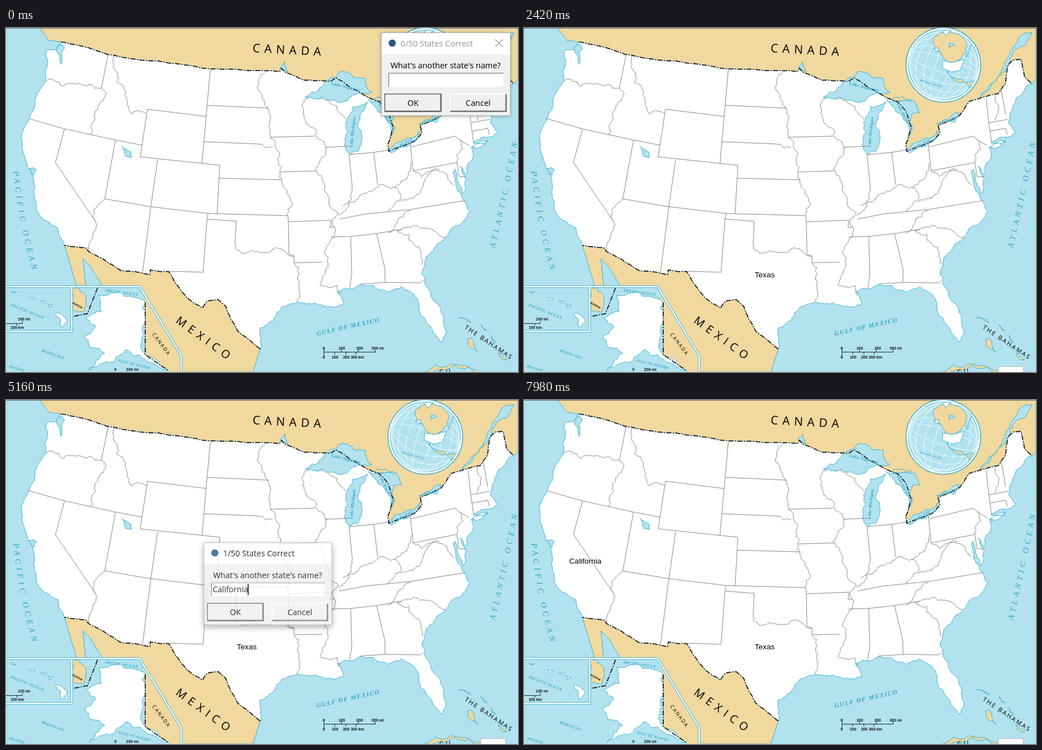
An HTML page that plays this animation: 912 by 614 pixels, repeating every 8 s.

```html
<!DOCTYPE html>
<html lang="en">
<head>
<meta charset="utf-8">
<title>States quiz</title>
<style>
  html, body { margin: 0; width: 100%; height: 100%; overflow: hidden; background: #b2e2ee; }
  svg { display: block; }
  text { white-space: pre; }
  .sans { font-family: "Open Sans", "Noto Sans", sans-serif; }
  .sea { font-family: "Liberation Serif", "Noto Serif", serif; font-style: italic; fill: #2ba6c6; }
  .mark { font-family: "Liberation Sans", Arial, sans-serif; font-size: 13.6px; }
  .ui { font-family: "Open Sans", "Noto Sans", sans-serif; font-size: 14.35px; }
  .tiny { font: bold 7px "Liberation Sans", sans-serif; fill: #111; }
  .land { fill: #f0d89f; }
  .water { fill: #b2e2ee; }
  .usa { fill: #fff; }
  .shore { stroke: #35b0cf; }
  .border { stroke: #858585; }
  .dash { stroke: #1c1c1c; stroke-width: 1.8; stroke-dasharray: 9 2.5 2 2.5; }
</style>
</head>
<body>
<svg id="stage" width="912" height="614">
  <g id="map"></g>
  <g id="globe" transform="translate(747 66)"></g>
  <g id="labels"></g>
  <rect id="box" x="845.5" y="604.5" width="44" height="12" fill="#fff" stroke="#bbb"/>
  <text id="texas" class="mark" x="411" y="444.5">Texas</text>
  <text id="cali" class="mark" x="80.5" y="292">California</text>
  <g id="dialog">
    <rect id="shade" width="231" height="149" fill="#f0f0f0"/>
    <rect width="231" height="39" fill="#fff"/>
    <rect x=".5" y=".5" width="230" height="148" fill="none" stroke="#8c8c8c" stroke-opacity=".75"/>
    <circle cx="20" cy="19" r="6.5" fill="#25597f"/>
    <text id="title" class="ui" x="35" y="25" style="font-size:14.5px"></text>
    <path id="close" d="M203.5,12.5l13,13m0,-13l-13,13" fill="none" stroke-width="1.1"/>
    <text class="ui" x="17" y="64">What's another state's name?</text>
    <rect x="13" y="72" width="205" height="25" fill="#fff"/>
    <path d="M13.5,97V72.5H218" fill="none" stroke="#8a8a8a"/>
    <path d="M14.5,96V73.5H217" fill="none" stroke="#c9c9c9"/>
    <text id="entry" class="ui" x="16" y="90"></text>
    <rect id="caret" y="75" width="2" height="20"/>
    <g id="buttons"></g>
  </g>
</svg>
<script>
const $ = id => document.getElementById(id);
const add = (id, svg) => $(id).insertAdjacentHTML('beforeend', svg);

let seed = 11;
const rnd = () => (seed = (seed * 16807) % 2147483647) / 2147483647;

// Midpoint displacement turns a few points into a natural shoreline.
function rough(s, amp) {
  const pts = s.trim().split(/\s+/).map(p => p.split(',').map(Number));
  const out = [pts[0]];
  const split = (a, b) => {
    const dx = b[0] - a[0], dy = b[1] - a[1];
    if (Math.hypot(dx, dy) < 3) return out.push(b);
    const k = (rnd() - .5) * amp;
    const m = [(a[0] + b[0]) / 2 - dy * k, (a[1] + b[1]) / 2 + dx * k];
    split(a, m);
    split(m, b);
  };
  pts.slice(1).forEach((p, i) => split(pts[i], p));
  return out.map(p => p[0].toFixed(1) + ',' + p[1].toFixed(1)).join(' ');
}
const poly = (pts, cls) => `<polygon class="${cls}" points="${pts}"/>`;
const line = (pts, cls) => `<polyline fill="none" class="${cls}" points="${pts}"/>`;
const blob = (s, cls, amp = .35) => {
  const pts = s.trim().split(/\s+/);
  return poly(rough([...pts, pts[0]].join(' '), amp), cls + ' shore');
};
const land = s => add('map', blob(s, 'land'));
const water = s => add('map', blob(s, 'water'));
const white = s => add('map', blob(s, 'usa'));
const border = s => add('map', line(s, 'border'));
const river = s => add('map', line(rough(s, .45), 'border'));

const north = rough(`98,25 180,47 363,73 487,78 491,72 497,79 530,93 578,95 588,89 645,124 664,131
  680,148 690,178 680,208 682,220 728,202 741,187 738,174 775,157 793,131 845,117 858,98 862,66
  872,57 885,56 892,88 905,100`, .06);
const atlantic = rough(`905,100 866,152 863,170 877,187 832,205 858,200 830,214 830,236 818,262
  808,246 820,270 814,296 800,252 802,285 819,312 826,326 793,358 784,373 757,400 741,440 746,456`, .35);
const gulf = rough(`746,456 768,492 784,540 776,561 748,524 738,512 731,482 704,462 680,472 655,460
  613,466 590,470 600,495 550,490 520,489 492,498 452,536 453,573`, .32);
const south = rough(`453,573 412,540 392,498 378,485 358,488 350,500 322,481 290,435 257,432 256,440
  205,433 146,398 143,393 104,388`, .08);
const pacific = rough('104,388 92,356 62,338 54,325 47,263 34,232 28,200 41,162 71,95 74,60 72,40 90,38 98,25', .2);

add('map', '<rect width="912" height="614" class="water"/>');
add('map', poly(north + ' 912,92 912,0 60,0 76,22', 'land shore'));
add('map', poly(south + ' 126,461 142,461 137,412 150,425 172,461 232,461 300,614 440,614 448,588', 'land shore'));
add('map', poly([north, atlantic, gulf, south, pacific].join(' '), 'usa'));
for (const coast of [atlantic, gulf, pacific]) add('map', line(coast, 'shore'));

// lakes and bays
water('533,123 574,93 600,77 640,90 652,115 622,119 605,131 562,123');
water('605,170 618,140 645,133 626,172 627,220 612,226 604,200');
water('645,127 688,126 706,152 692,152 692,182 684,196 682,170 657,140');
water('680,219 705,203 741,181 716,211 686,223');
water('735,171 775,151 765,169');
water('206,211 223,222 224,231 214,230');
water('95,28 104,36 98,65 90,42');
water('488,72 496,60 503,79');
water('41,250 54,253 50,263');
water('812,124 862,52 880,20 905,8 850,80');
land('655,127 676,123 690,131');
white('828,214 858,203 848,211');

// western states
border('182,47 170,107');
border('41,162 104,180 195,200 242,209');
border('104,181 88,240 160,346');
border('195,200 176,305 258,319 360,331 502,335');
border('381,245 239,230 252,145 357,158');
border('270,235 258,319 243,438');
border('364,74 349,242');
border('358,138 468,143');
border('353,203 450,207');
border('381,245 376,331');
border('379,268 492,271');
border('360,331 358,341 410,345 408,386');
border('358,341 351,436 290,434');
river('71,95 100,104 125,100 170,107 178,118 157,157 150,190');
river('195,48 192,72 213,115 218,140 225,153 250,153');
river('176,305 158,322 157,342 162,350 155,365 146,398');

// central states
border('471,195 550,193');
border('488,257 552,255');
border('502,335 503,346 579,343 577,356 585,355');
border('503,346 504,404 513,407 513,419 563,418');
river('450,207 475,212');
river('461,79 472,160 471,195 488,257 501,290 502,335');
river('408,386 450,400 513,407');
river('513,419 522,440 519,489');
river('540,124 527,140 528,152 550,180 570,220 552,255 573,298 592,330');
river('592,330 567,400 559,458 590,460 595,475');
river('556,126 590,140 605,163');
border('568,213 611,211');

// eastern states
border('611,226 617,285');
border('611,226 655,222 680,218');
border('655,222 662,280');
border('720,205 725,255 803,240 807,265 820,266');
border('722,212 800,193 808,200 825,210');
border('594,341 640,332 720,324 818,308');
border('578,373 614,372 660,367 705,359');
border('614,372 616,440 612,465');
border('660,367 675,430 675,454');
border('632,457 675,454 738,455 744,450');
border('823,125 828,170 833,205');
border('850,110 858,155');
border('828,169 862,163');
border('830,184 858,179 861,190');
river('617,285 600,318');
river('592,335 612,310 665,280 693,285 720,255 725,240');
river('693,285 702,307 680,328');
river('702,309 725,305 745,275 772,252');
river('725,255 740,265 765,250 797,280');
river('720,324 695,350 680,365');
river('697,361 742,422');
river('697,361 715,355 760,360 783,374');
river('808,200 814,216 803,240');
river('840,117 838,165');
add('map', line(north, 'dash') + line(south, 'dash'));

// southern islands
land('806,517 818,520 828,527');
land('822,555 829,553 840,579');
land('846,529 857,540 851,538');
land('862,548 872,562 866,557');
land('876,580 892,592 884,592');
land('740,616 800,602 845,616');

// inset panels
add('map', poly('0,462 238,462 312,585 312,614 0,614', 'water'));
add('map', poly('238,463 312,585 312,614 292,614 248,583 248,490', 'land'));
land('118,463 128,463 143,494 138,508 118,503');
white(`165,477 200,470 248,490 248,583 290,612 238,584 213,575 192,596 148,611 176,581 149,570 140,550
  160,533 142,518 170,505`);
white('8,469 19,471 13,474');
white('42,481 52,484 45,486');
white('62,487 72,488 70,492');
white('74,492 84,494 77,499');
white('88,510 109,522 98,534');
add('map', line('248,490 248,583 290,612', 'dash') + line('163,464 145,510 118,515', 'dash'));
for (const [color, width] of [['#3fb3d0', 4.4], ['#fff', 2.4]])
  add('map', `<path d="M0,461.5H238L312,585V614M117,462V541.5H0" fill="none" stroke="${color}" stroke-width="${width}"/>`);
add('map', '<rect width="912" height="1" fill="#666"/>');

// globe
const ring = (rx, ry) => `<ellipse rx="${rx}" ry="${ry}" fill="none" stroke="#fff" stroke-opacity=".7"/>`;
const arcs = [.22, .5, .76, .94].map(k => ring(62 * k, 62) + ring(62, 62 * k)).join('');
add('globe', '<circle r="66.5" fill="#fff" stroke="#35a9c8" stroke-width="1.5"/><circle r="62.5" class="water shore"/>');
add('globe', `<g transform="rotate(18)">${arcs}</g>`);
add('globe', blob('-18,-48 -5,-58 18,-57 42,-36 25,-8 5,-8 -14,-30', 'land'));
add('globe', blob('12,-40 20,-36 10,-30', 'water'));
add('globe', blob('-2,-59 14,-61 4,-52', 'usa'));
add('globe', blob('-18,-29 -9,-31 -7,-22', 'usa'));
add('globe', blob('-2,-7 38,-10 31,9 14,13 -2,5', 'usa', .2));
add('globe', blob('6,10 24,24 40,33 18,25', 'land'));
add('globe', blob('40,30 55,29 46,42', 'land'));

// lettering
const label = (s, x, y, turn, size, gap, cls = 'sans', weight = 400) => add('labels',
  `<text class="${cls}" transform="translate(${x} ${y}) rotate(${turn})" font-size="${size}"
    letter-spacing="${gap}" font-weight="${weight}">${s}</text>`);
const sea = (s, x, y, turn, size = 7, gap = .3) => label(s, x, y, turn, size, gap, 'sea', 700);
const curve = (id, d, s, gap) => add('labels',
  `<path id="${id}" d="${d}" fill="none"/><text class="sea" font-size="14.5" letter-spacing="${gap}"><textPath href="#${id}">${s}</textPath></text>`);
const tiny = (s, x, y) => add('labels', `<text class="tiny" x="${x}" y="${y}" text-anchor="middle">${s}</text>`);

curve('west', 'M13,256Q22,345 49,440', 'PACIFIC OCEAN', 6.2);
curve('east', 'M871,393Q893,300 914,190', 'ATLANTIC OCEAN', 5.8);
label('CANADA', 439, 43, 3, 21, 7.6);
label('MEXICO', 301, 525, 36, 20, 8);
label('THE BAHAMAS', 816, 536, 34, 11, 2.4);
label('CANADA', 260, 547, 53, 9, 2);
label('CU', 772, 618, -4, 12, 4);
label('RUSSIA', 118, 492, 28, 5, .3, 'sans', 700);
sea('GULF OF MEXICO', 554, 549, -12.5, 11, 1.5);
sea('Lake Superior', 579, 101, 14, 8, .5);
sea('Lake Michigan', 617, 213, -84, 8);
sea('Lake Huron', 664, 136, 62);
sea('Lake Erie', 697, 216, -30);
sea('Lake Ontario', 738, 174, -20, 6, 0);
sea('PACIFIC OCEAN', 8, 496, 22, 7, .8);
sea('ARCTIC OCEAN', 176, 470, 8, 7, .7);
sea('BERING SEA', 63, 577, 20, 6.5);
sea('GULF OF ALASKA', 200, 595, 14, 6.5);
sea('PACIFIC', 5, 606, 16);
sea('PACIFIC OCEAN', 705, 95, 16, 5);
sea('ATLANTIC', 789, 54, -68, 5);

// scale bars
['0', '100', '200', '300 mi'].forEach((s, i) => tiny(s, 566 + i * 32, 574));
['0', '100', '200', '300 km'].forEach((s, i) => tiny(s, 566 + i * 20, 590));
add('labels', `<path d="M566.5,570V588M566,578.5H658M585.5,578v5m20,-5v5m18,-5v5M597.5,574v5m30,-5v5m30,-5v5
  M0,527.5H29V523M19.5,527v4" fill="none" stroke="#222"/>`);
tiny('100 mi', 32, 522);
tiny('100 km', 20, 537);
tiny('0', 195, 612);
tiny('200 mi', 225, 612);

const button = (x, s, ring) => add('buttons', `<g transform="translate(${x} 109)">
  <rect width="102" height="33" fill="#f0f0f0"/>
  <path d="M1,32V1H101" fill="none" stroke="#fff" stroke-width="2"/>
  <path d="M1,32H101V1" fill="none" stroke="#777" stroke-width="2"/>
  <path d="M2,30.5H99.5V2" fill="none" stroke="#a5a5a5"/>
  <rect x=".75" y=".75" width="100.5" height="31.5" fill="none" stroke="${ring}" stroke-width="1.5"/>
  <text class="ui" x="51" y="22" text-anchor="middle">${s}</text></g>`);
button(6, 'OK', '#606060');
button(122, 'Cancel', 'none');

// Each step changes part of the state from its time on.
const steps = [];
const at = (time, change) => steps.push({ time, change });
const type = (word, from, to, time, gap) => {
  for (let n = from; n <= to; n++) at(time + (n - from) * gap, { text: word.slice(0, n) });
};
const fadeOut = t => {
  at(t, { x: 0 });
  at(t + 60, { op: .8 });
  at(t + 130, { op: .4 });
  at(t + 200, { op: 0 });
};
const fadeIn = (t, n) => {
  at(t, { n, text: '', x: 1, mid: 1, caret: 1, op: .4 });
  at(t + 60, { op: .84 });
  at(t + 130, { op: .96 });
  at(t + 200, { op: 1 });
};
const caret = (time, on) => at(time, { caret: on });

at(0, { n: 0, text: '', caret: 0, op: 1, active: 0, x: 1, mid: 0, box: 0, texas: 0, cali: 0 });
at(200, { active: .5 });
at(270, { active: 1 });
caret(800, 1);
at(890, { box: 1 });
type('Texas', 1, 5, 990, 95);
caret(1370, 0);
caret(1470, 1);
caret(1730, 0);
caret(2090, 1);
fadeOut(2150);
at(2400, { texas: 1 });
fadeIn(2480, 1);
caret(3010, 0);
type('V', 1, 1, 3210, 0);
caret(3280, 1);
caret(3810, 0);
type('', 0, 0, 3880, 0);
type('California', 1, 1, 4020, 0);
caret(4160, 1);
type('California', 2, 10, 4160, 88);
fadeOut(5100);
at(5620, { cali: 1 });
fadeIn(5690, 2);
caret(6230, 0);
type('Washington', 1, 1, 6230, 0);
caret(6350, 1);
type('Washington', 2, 2, 6560, 0);
type('Washington', 3, 5, 6700, 100);
type('Washington', 7, 7, 7100, 0);
caret(7300, 0);
type('Washington', 8, 10, 7300, 70);
caret(7500, 1);
fadeOut(7770);

const show = (id, v) => $(id).setAttribute('opacity', v);
let last = 0;
function draw(t) {
  const past = steps.filter(s => s.time <= t);
  if (past.length === last) return;
  last = past.length;
  const s = Object.assign({}, ...past.map(p => p.change));
  const [x, y] = s.mid ? [351, 253.5] : [668, 8];
  const k = 1 - (1 - s.op) * .05;
  $('dialog').setAttribute('transform', `translate(${x + 115.5} ${y + 74.5}) scale(${k}) translate(-115.5 -74.5)`);
  show('dialog', s.op);
  $('title').textContent = s.n + '/50 States Correct';
  const grey = 145 * (1 - s.active);
  $('title').style.fill = $('close').style.stroke = `rgb(${grey},${grey},${grey})`;
  $('shade').style.filter = `drop-shadow(0 ${1 + 3 * s.active}px ${3 + 3 * s.active}px rgba(0,0,0,${.25 + .15 * s.active}))`;
  show('close', s.x);
  $('entry').textContent = s.text;
  $('caret').setAttribute('x', 15 + (s.text ? $('entry').getComputedTextLength() : 0));
  for (const id of ['caret', 'box', 'texas', 'cali']) show(id, s[id]);
}
const start = performance.now();
function tick() {
  draw((performance.now() - start) % 8000);
  requestAnimationFrame(tick);
}
tick();
</script>
</body>
</html>
```
